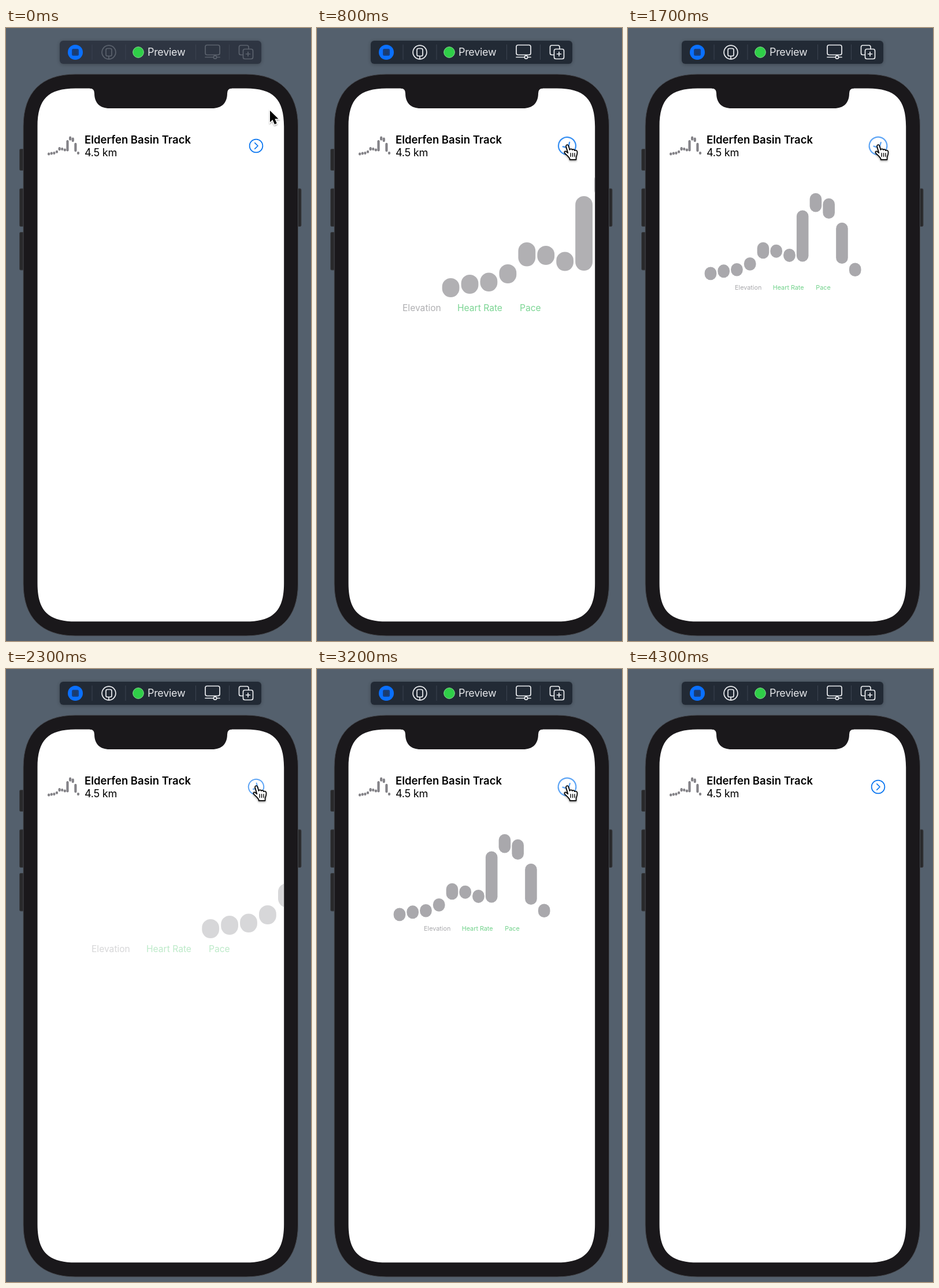
An HTML page for the animation above (4.4 s loop, 528x1061 px).

```html
<!DOCTYPE html>
<html lang="en">
<head>
<meta charset="utf-8">
<title>Trail preview</title>
<style>
  html, body { margin: 0; width: 100%; height: 100%; overflow: hidden; background: #54606d; }
  svg { display: block; width: 100vw; height: 100vh; font-family: Inter, sans-serif; }
  .line { fill: none; stroke-linecap: round; stroke-linejoin: round; }
  .label { font-size: 15.6px; }
</style>
</head>
<body>
<svg viewBox="0 0 528 1061">
  <defs>
    <clipPath id="screenClip"><path id="screenShape"/></clipPath>
    <g id="bars" fill="#838287"></g>
    <filter id="soft" x="-30%" y="-50%" width="160%" height="200%">
      <feDropShadow dx="0" dy="1" stdDeviation="3" flood-opacity=".28"/>
    </filter>
    <filter id="cursorShadow" x="-30%" y="-30%" width="170%" height="170%">
      <feDropShadow dx="0" dy="1.5" stdDeviation="1.3" flood-opacity=".4"/>
    </filter>
  </defs>

  <!-- toolbar -->
  <rect id="toolbar" x="93" y="22" width="349" height="40" rx="6" filter="url(#soft)"/>
  <path d="M149 28.500V55M207 28.500V55M328.500 28.500V55M386.500 28.500V55" stroke="#3b4350"/>
  <circle cx="120" cy="42" r="13" fill="#0a70ff"/>
  <rect x="114" y="36" width="12" height="12" rx="2.500" fill="#173f80"/>
  <path d="M116.500 39.500h7M116.500 42h7M116.500 44.500h7" stroke="#24364f"/>
  <circle cx="229" cy="42" r="9.300" fill="#2fcf48" stroke="#86dd90"/>
  <text x="245" y="48" font-size="18" letter-spacing="-.3" fill="#e4e6e9">Preview</text>
  <g id="icons" class="line" stroke-width="1.700">
    <circle cx="178" cy="42" r="11.900"/>
    <path d="M175.500 48.500Q173 48.500 173 46V38Q173 35.500 175.500 35.500H180.500Q183 35.500 183 38V46Q183 48.500 180.500 48.500ZM178 48.500V53.500"/>
    <rect x="345" y="29.500" width="25" height="17" rx="3"/>
    <path d="M345 50.500H359M365 50.500H370"/>
    <circle cx="362" cy="50.500" r="2.700"/>
    <path d="M410 46.500H406.500Q403.500 46.500 403.500 43.500V33Q403.500 30 406.500 30H417Q420 30 420 33V36.500"/>
    <rect x="410.500" y="36.500" width="17" height="17" rx="3"/>
    <path d="M419 41.500V48.500M415.500 45H422.500"/>
  </g>

  <!-- phone -->
  <g fill="#29292b" stroke="#3b3e43">
    <rect x="23.500" y="209.500" width="9" height="37" rx="2"/>
    <rect x="23.500" y="278" width="9" height="65.500" rx="2"/>
    <rect x="23.500" y="353.500" width="9" height="65.500" rx="2"/>
    <rect x="502" y="278" width="9" height="65.500" rx="2"/>
  </g>
  <path id="body" fill="#1a181b" stroke="#46494f"/>
  <use href="#screenShape" fill="#fff"/>
  <path fill="#1a181b" d="M145 103.500V104.500Q153 104.500 153 113C153 130 163 139 179 139H357C373 139 383 130 383 113Q383 104.500 391 104.500V103.500Z"/>

  <!-- list row -->
  <use href="#bars" transform="translate(72 187.500) scale(.1405 .151) translate(-72 -248)"/>
  <text x="136" y="199.500" font-size="18.5" font-weight="600">Elderfen Basin Track</text>
  <text x="136" y="222" font-size="18.2" letter-spacing="-.3">4.5 km</text>
  <g id="toggle" class="line" stroke="#0a76f0" stroke-width="1.700">
    <circle r="11.400"/>
    <path d="M-2.200 -5.200L3 0L-2.200 5.200"/>
  </g>

  <!-- detail -->
  <g clip-path="url(#screenClip)">
    <g id="detail">
      <use id="chart" href="#bars"/>
      <g class="label" fill="#2fbd55">
        <text x="148" y="490" fill="#808085">Elevation</text>
        <text x="243" y="490">Heart Rate</text>
        <text x="351" y="490">Pace</text>
      </g>
    </g>
  </g>

  <!-- cursors -->
  <path id="arrow" d="M0 0V20l4.500-4.200 3.500 8 3.800-1.700-3.400-7.800h6.100z" stroke="#fff" stroke-width="2.400" paint-order="stroke" filter="url(#cursorShadow)"/>
  <g id="hand" class="line" stroke="#000" filter="url(#cursorShadow)">
    <path fill="#fff" stroke-width="1.600" d="M7.500 15L4.500 4.500C4 1.200 7.500 .5 8.500 3.500L10.500 10C11 7.800 14 7.800 14.500 10C15.500 8.500 18 9 18.500 11C20 10 22.500 10.700 22.800 13C23.200 17 21.500 19.500 21 22V26H10.500V24C8.500 21 6.500 19 3.500 16.500C.2 13.500 2.300 11.300 5 13Z"/>
    <path stroke-width="1.300" d="M12 15.500V21M15.300 15.500V21M18.600 15.500V21"/>
  </g>
</svg>
<script>
const $ = id => document.getElementById(id);
const set = (id, attrs) => {
  for (const key in attrs) $(id).setAttribute(key, attrs[key]);
};
const LOOP = 4400, TOGGLE_TIME = 350, PRESS_TIME = 90;
const clicks = [599, 1566, 2164, 3066];
const barRanges = [
  [433, 466], [427, 460], [423.5, 456], [409, 442], [371, 412.5], [377, 410],
  [387.5, 420.5], [291, 420], [248, 295.5], [261, 312], [322, 425], [423, 457]
];

$('bars').innerHTML = barRanges.map(([top, bottom], i) =>
  `<rect x="${72 + i * 32.94}" y="${top}" width="29.8" height="${bottom - top}" rx="14.9"/>`).join('');

// Rounded rectangle with continuous corners; k sets their fullness.
function squircle(x, y, w, h, r, k) {
  const c = r * k, s = r - c, a = w - 2 * r, b = h - 2 * r;
  return `M${x + r} ${y}h${a}c${c} 0 ${r} ${s} ${r} ${r}v${b}c0 ${c} ${-s} ${r} ${-r} ${r}` +
    `h${-a}c${-c} 0 ${-r} ${-s} ${-r} ${-r}v${-b}c0 ${-c} ${s} ${-r} ${r} ${-r}z`;
}
set('body', { d: squircle(30, 80, 475.5, 972, 90, .65) });
set('screenShape', { d: squircle(54.5, 104.5, 426.7, 922.8, 66, .72) });

const clamp = v => Math.min(1, Math.max(0, v));
const mix = (a, b, p) => a + (b - a) * p;
const bezier = (a, b, c, d, s) => {
  const q = 1 - s;
  return q * q * q * a + 3 * q * q * s * b + 3 * q * s * s * c + s * s * s * d;
};

// cubic-bezier(.42, 0, .58, 1)
function ease(x) {
  if (x <= 0 || x >= 1) return clamp(x);
  let lo = 0, hi = 1;
  for (let i = 0; i < 20; i++) {
    const mid = (lo + hi) / 2;
    if (bezier(0, .42, .58, 1, mid) < x) lo = mid; else hi = mid;
  }
  return bezier(0, 0, 1, 1, lo);
}

function drawToolbar(t) {
  const p = clamp((t - 80) / 150);
  const grey = (from, to) => `rgb(${from.map((v, i) => mix(v, to[i], p))})`;
  set('toolbar', { fill: grey([47, 54, 66], [34, 41, 54]) });
  set('icons', { stroke: grey([91, 98, 109], [236, 238, 241]) });
}

function drawDetail(t) {
  const count = clicks.filter(c => c <= t).length;
  const opening = count % 2 === 1;
  const p = count ? ease((t - clicks[count - 1]) / TOGGLE_TIME) : 1;
  const open = opening ? p : 1 - p;
  const pressed = clicks.some(c => t < c && t > c - PRESS_TIME);

  set('toggle', {
    transform: `translate(433 204) rotate(${90 * open}) scale(${1 + open / 2})`,
    opacity: pressed ? .5 : .5 + p / 2
  });
  // Slides in from the right, shrinks away on closing.
  const scale = opening ? 1 : open;
  set('chart', { transform: `translate(${opening ? 392 * (1 - open) : 0} 0)` });
  set('detail', {
    opacity: open,
    visibility: open > 0 ? 'visible' : 'hidden',
    transform: `translate(268 370) scale(${scale}) translate(-268 -370)`
  });
}

function drawCursor(t) {
  const p = ease((t - 70) / 430);
  const x = bezier(457, 480, 465, 433, p), y = bezier(143, 230, 250, 203, p);
  const onButton = Math.hypot(x - 433, y - 204) < 12;
  set('arrow', { transform: `translate(${x} ${y})`, visibility: onButton ? 'hidden' : 'visible' });
  set('hand', {
    transform: `translate(${x - 6.5} ${y - 2.5}) scale(1.05)`,
    visibility: onButton && t < 4200 ? 'visible' : 'hidden'
  });
}

function frame() {
  const t = performance.now() % LOOP;
  drawToolbar(t);
  drawDetail(t);
  drawCursor(t);
  requestAnimationFrame(frame);
}
frame();
</script>
</body>
</html>
```
